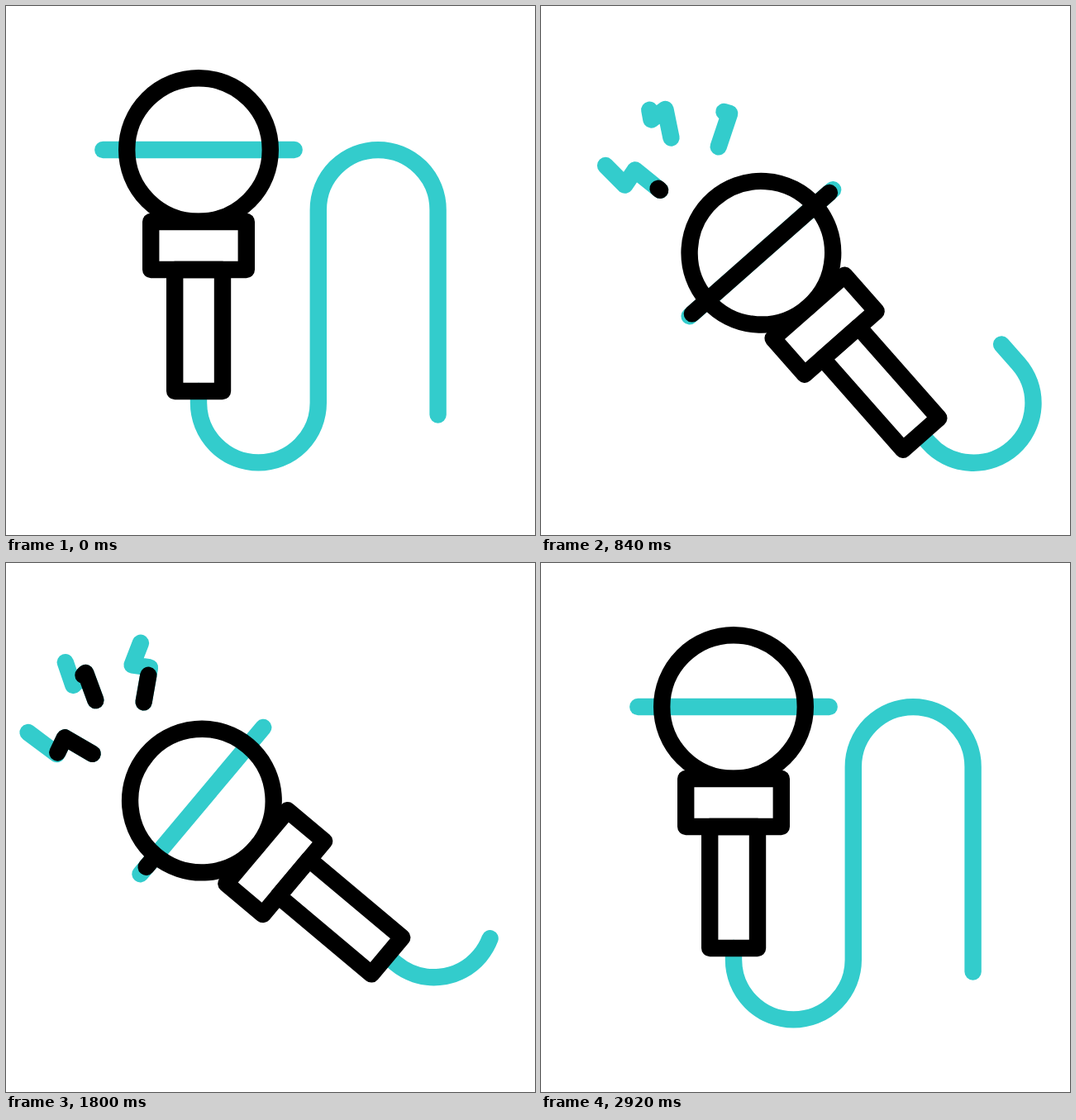
Animation of 640 by 640 pixels, one loop 3 s. Source, as an HTML page:

```html
<!DOCTYPE html>
<html lang="en">
<head>
<meta charset="utf-8">
<title>Microphone</title>
<style>
  html, body { margin: 0; width: 100%; height: 100%; overflow: hidden; background: #fff; }
  svg { display: block; width: 100%; height: 100%; }
  path, circle, rect { fill: none; stroke: #000; stroke-width: 20.4; stroke-linecap: round; stroke-linejoin: round; }
  .teal { stroke: #33cccc; }
</style>
</head>
<body>
<svg viewBox="0 0 640 640">
  <g id="mic">
    <path id="cord" class="teal" d="M233 466V480a72.4 72.4 0 0 0 144.8 0V246.5a72.4 72.4 0 0 1 144.8 0V494.5"/>
    <path class="teal" d="M117.3 174H348.7"/>
    <path id="bar" d="M117.3 174H348.7"/>
    <g id="bolts"></g>
    <circle cx="233" cy="174" r="86.8"/>
    <rect x="175.2" y="261" width="115.6" height="58"/>
    <rect x="204.2" y="319" width="57.8" height="147"/>
  </g>
</svg>
<script>
  const LOOP = 3000, STEP = 40;
  const byId = id => document.getElementById(id);

  const rest = { tilt: 0, x: 0, y: 0 };
  const raised = { tilt: 41.6, x: 100.7, y: 99.4 };
  const forward = { tilt: 32.8, x: 125, y: 84.8 };
  const back = { tilt: 50, x: 82.4, y: 77 };

  // Eased progress from 0 to 1
  function ramp(t, start, duration) {
    const k = Math.min(1, Math.max(0, (t - start) / duration));
    return k * k * (3 - 2 * k);
  }

  const mix = (a, b, k) => ({
    tilt: a.tilt + (b.tilt - a.tilt) * k,
    x: a.x + (b.x - a.x) * k,
    y: a.y + (b.y - a.y) * k
  });

  function poseAt(t) {
    let pose = mix(rest, raised, ramp(t, 80, 632));
    pose = mix(pose, forward, ramp(t, 800, 470));
    pose = mix(pose, back, ramp(t, 1350, 450));
    return mix(pose, rest, ramp(t, 2227, 475));
  }

  // The cord is pulled in, drifts a little, then runs out again
  const cordEnd = t => 1 - .852 * ramp(t, 80, 1020) - .021 * ramp(t, 1100, 300)
    + .075 * ramp(t, 1400, 870) + .798 * ramp(t, 2270, 645);

  const drawAndErase = (t, draw, drawTime, erase, eraseTime) =>
    ramp(t, draw, drawTime) - ramp(t, erase, eraseTime);

  function trim(path, start, end) {
    const length = path.getTotalLength();
    path.style.display = end > start ? '' : 'none';
    path.style.strokeDasharray = `${Math.max(0, end - start) * length} ${2 * length}`;
    path.style.strokeDashoffset = -start * length;
  }

  function addBolt(d, className) {
    const path = document.createElementNS('http://www.w3.org/2000/svg', 'path');
    path.setAttribute('d', d);
    path.setAttribute('class', className);
    byId('bolts').append(path);
    return path;
  }

  const bolts = [
    'M191.5 36.2L184.9 -2.1L163.6 3.3L161.1 -40.7',
    'M243.5 -2.5L261 -33.1L240 -34.9L257.1 -63.3',
    'M279.2 43.5L316 22.2L304.6 3.9L342.7 -9.1'
  ].map(d => ({ teal: addBolt(d, 'teal'), black: addBolt(d, '') }));

  function render(t) {
    const { tilt, x, y } = poseAt(t);
    byId('mic').setAttribute('transform', `translate(${x} ${y}) rotate(${-tilt} 233 276.5)`);
    trim(byId('cord'), 0, cordEnd(t));
    trim(byId('bar'), .048 * ramp(t, 360, 1120), drawAndErase(t, 292, 604, 1310, 604));
    // Bolts appear one after another and vanish in reverse order
    bolts.forEach(({ teal, black }, i) => {
      trim(teal, 0, drawAndErase(t, 360 + i * (45 + 25 * i), 600, 1780 - 40 * i, 480));
      trim(black, 0, drawAndErase(t, 785 + 60 * i, 520, 1580 - 40 * i, 480));
    });
  }

  const begin = performance.now();
  function tick() {
    const t = (performance.now() - begin) % LOOP;
    render(Math.floor(t / STEP) * STEP);
    requestAnimationFrame(tick);
  }
  tick();
</script>
</body>
</html>
```
